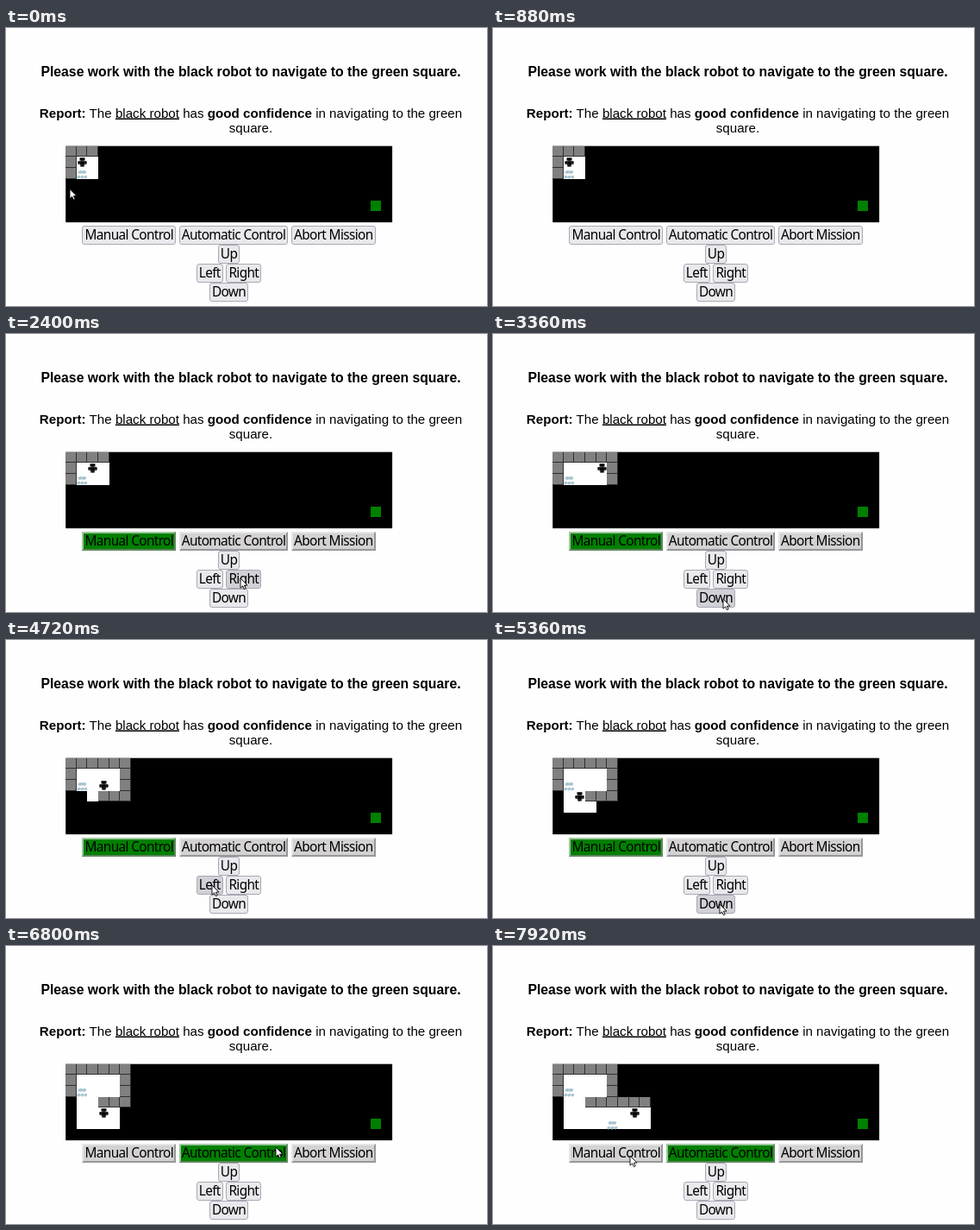
Recreate the animation shown at these times as an HTML page with a canvas. Size 558x322 px, loop 8000 ms.

```html
<!DOCTYPE html>
<html lang="en">
<head>
<meta charset="utf-8">
<title>Robot navigation</title>
<style>
  html, body { margin: 0; width: 100%; height: 100%; overflow: hidden; background: #fefefe; }
  #stage { position: relative; width: 558px; height: 322px; overflow: hidden; }
  svg, canvas { position: absolute; left: 0; top: 0; }
  .copy { font: 15.15px "Liberation Sans", Arial, sans-serif; text-anchor: middle; }
  .copy .title { font-size: 15.78px; }
  .copy .title, .copy .b { font-weight: bold; }
  .copy .u { text-decoration: underline; }
  #panel { position: absolute; top: 229px; left: 0; width: 517px; }
  .row { display: flex; justify-content: center; gap: 3.7px; height: 22px; }
  .btn {
    box-sizing: border-box; height: 21.5px; padding: 0 2px;
    font: 15.4px/19.5px "Noto Sans", "Open Sans", sans-serif; letter-spacing: -.65px; white-space: nowrap;
    color: #000; background: #e9e9ed; border: 1px solid #a9a9b4; border-radius: 3px;
  }
  .btn.hover { background: #d0d0d7; }
  .btn.idle, .btn.active {
    border: 2px solid; border-color: #e6e6e8 #96969c #96969c #e6e6e8; border-radius: 0;
    padding: 0 1px; line-height: 17.5px; background: #d3d1d2;
  }
  .btn.active { background: #008000; border-color: #9fc79f #5f855f #5f855f #9fc79f; }
</style>
</head>
<body>
<div id="stage">
  <svg class="copy" width="558" height="322">
    <text class="title" x="284" y="55.7">Please work with the black robot to navigate to the green square.</text>
    <text x="284" y="103.5"><tspan class="b">Report:</tspan> The <tspan class="u">black robot</tspan> has <tspan class="b">good confidence</tspan> in navigating to the green</text>
    <text x="284" y="121">square.</text>
  </svg>
  <canvas id="map" width="558" height="322"></canvas>
  <div id="panel">
    <div class="row"><div class="btn">Manual Control</div><div class="btn">Automatic Control</div><div class="btn">Abort Mission</div></div>
    <div class="row"><div class="btn">Up</div></div>
    <div class="row"><div class="btn">Left</div><div class="btn">Right</div></div>
    <div class="row"><div class="btn">Down</div></div>
  </div>
  <svg width="558" height="322">
    <path id="cursor" d="M0 0V11.2L2.6 8.8L4.4 12.6L6.2 11.8L4.5 8.1H8Z" fill="#fff" stroke="#000" stroke-width=".9"/>
  </svg>
</div>
<script>
const LOOP = 8000, STEP = 80, PACE = 210;
const CELL = 12.63, X0 = 69.2, Y0 = 136.7, COLS = 30, ROWS = 7;
const MANUAL_AT = 1040, AUTO_AT = 6800;

// start time of each burst of steps; steps in a burst are PACE apart
const bursts = { 2160: "R", 2800: "RR", 3680: "D", 4400: "L", 4800: "L", 5360: "DD", 6160: "R", 7280: "RRRR" };
const dirs = { L: [-1, 0], R: [1, 0], D: [0, 1] };

const stops = [{ at: 0, c: 1, r: 1 }];
for (const [start, keys] of Object.entries(bursts))
  [...keys].forEach((key, i) => {
    const { c, r } = stops[stops.length - 1], [dc, dr] = dirs[key];
    stops.push({ at: +start + i * PACE, c: c + dc, r: r + dr });
  });

// places where the pointer rests
const rests = [
  { x: 74, y: 186.5, from: 0, to: 160 },
  { x: 143, y: 241, from: 640, to: 1120 },
  { x: 272, y: 283, from: 1760, to: 3040 },
  { x: 267, y: 307, from: 3280, to: 3760 },
  { x: 239, y: 284, from: 4240, to: 4800 },
  { x: 263, y: 306, from: 5120, to: 5600 },
  { x: 284, y: 279, from: 5840, to: 6240 },
  { x: 313, y: 233, from: 6720, to: 7520 },
  { x: 159, y: 243, from: 7920, to: LOOP }
];

const isWall = (c, r) =>
  r === 0 || (c === 0 && r < 3) || (c === 5 && r < 4) || (r === 3 && c > 2);
const isDebris = (c, r) => (c === 1 && r === 2) || (c === 5 && r === 5);

const buttons = [...document.querySelectorAll(".btn")];
const cursor = document.getElementById("cursor");
const g = document.getElementById("map").getContext("2d");
const edgeX = c => Math.round(X0 + c * CELL);
const edgeY = r => Math.round(Y0 + r * CELL);

function box(color, x, y, w, h) {
  g.fillStyle = color;
  g.fillRect(x, y, w, h);
}

function fillCell(color, c, r, inset = 0) {
  const x = edgeX(c), y = edgeY(r);
  box(color, x, y, edgeX(c + 1) - x - inset, edgeY(r + 1) - y - inset);
}

function atCell(c, r, draw) {
  g.save();
  g.translate(edgeX(c), edgeY(r));
  draw();
  g.restore();
}

function drawRobot() {
  // centred slabs: top, width, height
  const slab = (y, w, h) => box("#080808", 6.5 - w / 2, y, w, h);
  slab(1.2, 6, 3.4);
  slab(4.4, 3, 1);
  slab(5.2, 10, 2);
  slab(7, 6.4, 2.4);
  slab(9.2, 4.4, 2.4);
  for (const x of [1.5, 10]) box("#080808", x, 6, 1.5, 2.8);
}

function drawDebris() {
  g.fillStyle = "#a9c6d0";
  for (let i = 0; i < 7; i++) {
    g.beginPath();
    g.ellipse(2.4 + i * 1.35, 6.8 + 3.8 * Math.sin(1.6 + i * 2.1), 2.2, 1.6, -.4, 0, 7);
    g.fill();
  }
}

function drawMap(t) {
  const past = stops.filter(s => s.at <= t), robot = past[past.length - 1];
  const seen = (c, r) => past.some(s => Math.abs(s.c - c) < 2 && Math.abs(s.r - r) < 2);
  g.clearRect(0, 0, 558, 322);
  box("#000", X0, Y0, COLS * CELL, ROWS * CELL);
  for (let r = 0; r < ROWS; r++)
    for (let c = 0; c < COLS; c++) {
      if (!seen(c, r)) continue;
      fillCell(isWall(c, r) ? "#303030" : "#fff", c, r);
      if (isWall(c, r)) fillCell("#808080", c, r, 1);
      if (isDebris(c, r)) atCell(c, r, drawDebris);
    }
  fillCell("#008000", 28, 5);
  atCell(robot.c, robot.r, drawRobot);
}

function pointer(t) {
  const i = rests.findIndex(p => t <= p.to), b = rests[i];
  if (t >= b.from) return b;
  const a = rests[i - 1], k = (t - a.to) / (b.from - a.to), e = k * k * (3 - 2 * k);
  return { x: a.x + (b.x - a.x) * e, y: a.y + (b.y - a.y) * e };
}

function render(t) {
  drawMap(t);
  const { x, y } = pointer(t), shown = t < 720 || t >= MANUAL_AT;
  cursor.setAttribute("transform", `translate(${x} ${y})`);
  cursor.style.visibility = shown ? "visible" : "hidden";
  const mode = t < AUTO_AT ? 0 : 1;
  buttons.forEach((el, i) => {
    const b = el.getBoundingClientRect();
    const over = shown && x >= b.left && x <= b.right && y >= b.top && y <= b.bottom;
    const bevel = i < 3 && t >= MANUAL_AT;
    el.className = "btn " + (bevel ? (i === mode ? "active" : "idle") : over ? "hover" : "");
  });
}

let last = -1;
function tick() {
  const t = Math.floor(performance.now() % LOOP / STEP) * STEP;
  if (t !== last) render(last = t);
  requestAnimationFrame(tick);
}
tick();
</script>
</body>
</html>
```
